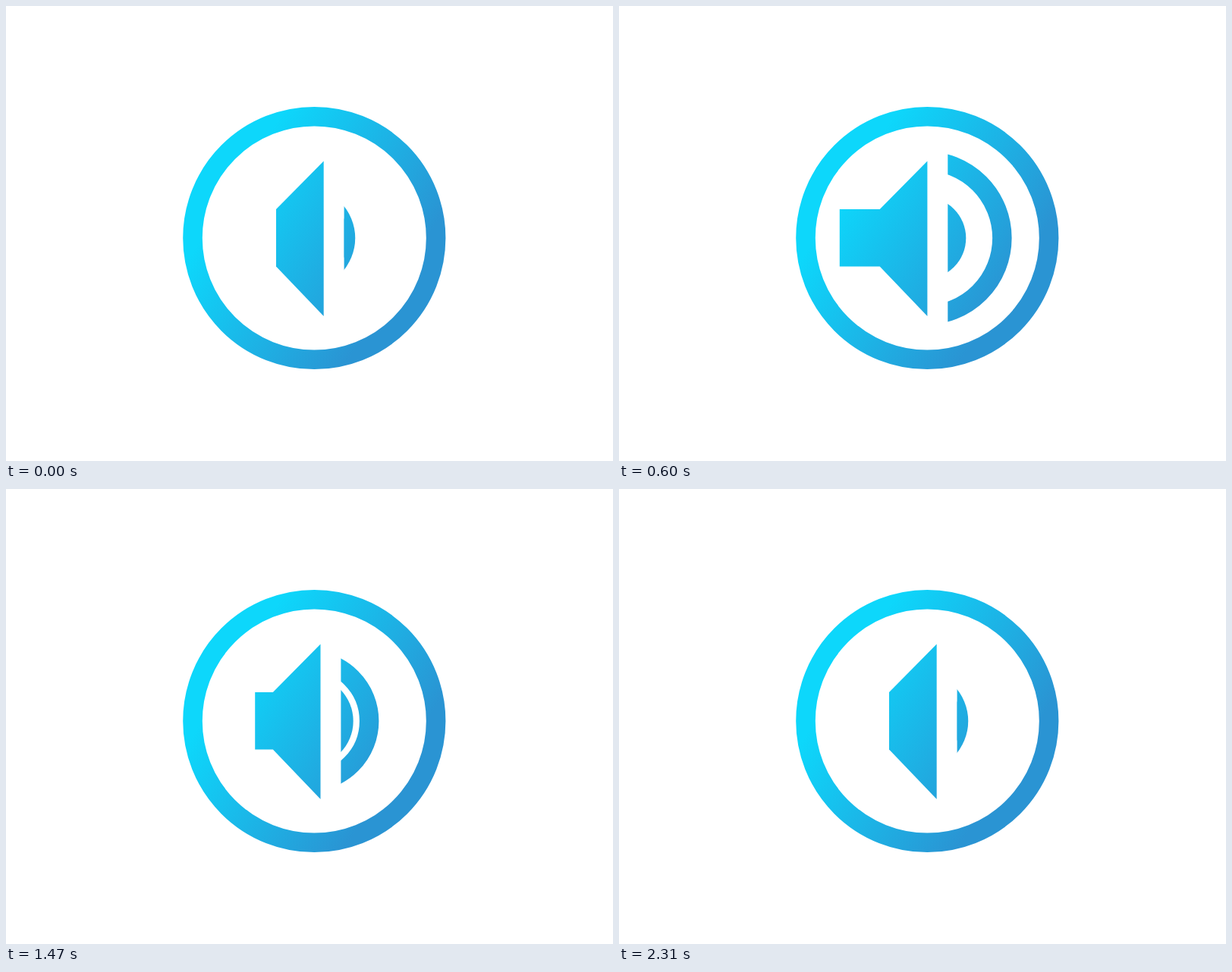
An HTML page for the animation above (2370 ms loop, 800x600 px).

```html
<!DOCTYPE html>
<html lang="en">
<head>
<meta charset="utf-8">
<title>Volume toggle</title>
<style>
  html, body { margin: 0; width: 100%; height: 100%; overflow: hidden; background: #fff; }
  svg { display: block; width: 100vw; height: 100vh; }
</style>
</head>
<body>
<svg viewBox="0 0 800 600">
  <defs>
    <linearGradient id="blue" gradientUnits="userSpaceOnUse" x1="301" y1="238.5" x2="511" y2="373.5">
      <stop offset="0" stop-color="#0dd7fb"/>
      <stop offset="1" stop-color="#2a94d3"/>
    </linearGradient>
    <clipPath id="window"><rect id="cut" y="150" width="200" height="320"/></clipPath>
  </defs>
  <circle cx="406.3" cy="306" r="160.3" fill="none" stroke="url(#blue)" stroke-width="25.6"/>
  <path id="speaker" fill="url(#blue)"/>
  <g clip-path="url(#window)">
    <circle id="outer" cy="306" fill="none" stroke="url(#blue)" stroke-width="25.5"/>
    <circle id="inner" cy="306" fill="url(#blue)"/>
  </g>
</svg>
<script>
const LOOP = 2370, STEP = 30, OPEN_AT = 180, CLOSE_AT = 1380, LAST_STEP = 31;
const STROKE = 25.5, GAP = 26.9, CONE = 62.7;
const el = id => document.getElementById(id);
const mix = (a, b, p) => a + (b - a) * p;

// Easings count time in steps.
const decay = (t, rate, delay = 0) => 1 - Math.exp(-rate * Math.max(0, t - delay));
const settle = (t, rate) => 1 - (1 + rate * t) * Math.exp(-rate * t);
const spring = (t, damp, freq) =>
  1 - Math.exp(-damp * t) * (Math.cos(freq * t) + damp / freq * Math.sin(freq * t));

function pose(ms) {
  const opening = ms >= OPEN_AT && ms < CLOSE_AT;
  const start = opening ? OPEN_AT : ms < OPEN_AT ? CLOSE_AT - LOOP : CLOSE_AT;
  const t = Math.min(LAST_STEP, Math.floor((ms - start) / STEP));
  const between = (closed, open, p) => opening ? mix(closed, open, p) : mix(open, closed, p);
  return {
    right: between(418.7, 406.4, spring(t, 0.5, 0.4)),
    base: between(0, 53, settle(t, 0.62)),
    center: between(393.3, 404.4, opening ? decay(t, 0.155) : settle(t, 0.62)),
    // The inner wave grows into the place where the outer one starts.
    outer: opening ? mix(67, 115.7, decay(t, 0.275, 0.57)) : mix(115.7, 58, settle(t, 0.45)),
    inner: opening ? mix(0, 58.1, decay(t, 0.275, 4.2)) : mix(58.1, 67, settle(t, 0.23))
  };
}

function draw(ms) {
  const { right, base, center, outer, inner } = pose(ms);
  const neck = right - CONE;
  el("speaker").setAttribute("d",
    `M${right} 204.5V409L${neck} 343.5H${neck - base}V268H${neck}Z`);
  el("cut").setAttribute("x", right + GAP);
  el("outer").setAttribute("cx", center);
  el("outer").setAttribute("r", outer - STROKE / 2);
  el("inner").setAttribute("cx", center);
  el("inner").setAttribute("r", inner);
}

const began = performance.now();
function tick() {
  draw((performance.now() - began) % LOOP);
  requestAnimationFrame(tick);
}
tick();
</script>
</body>
</html>
```
